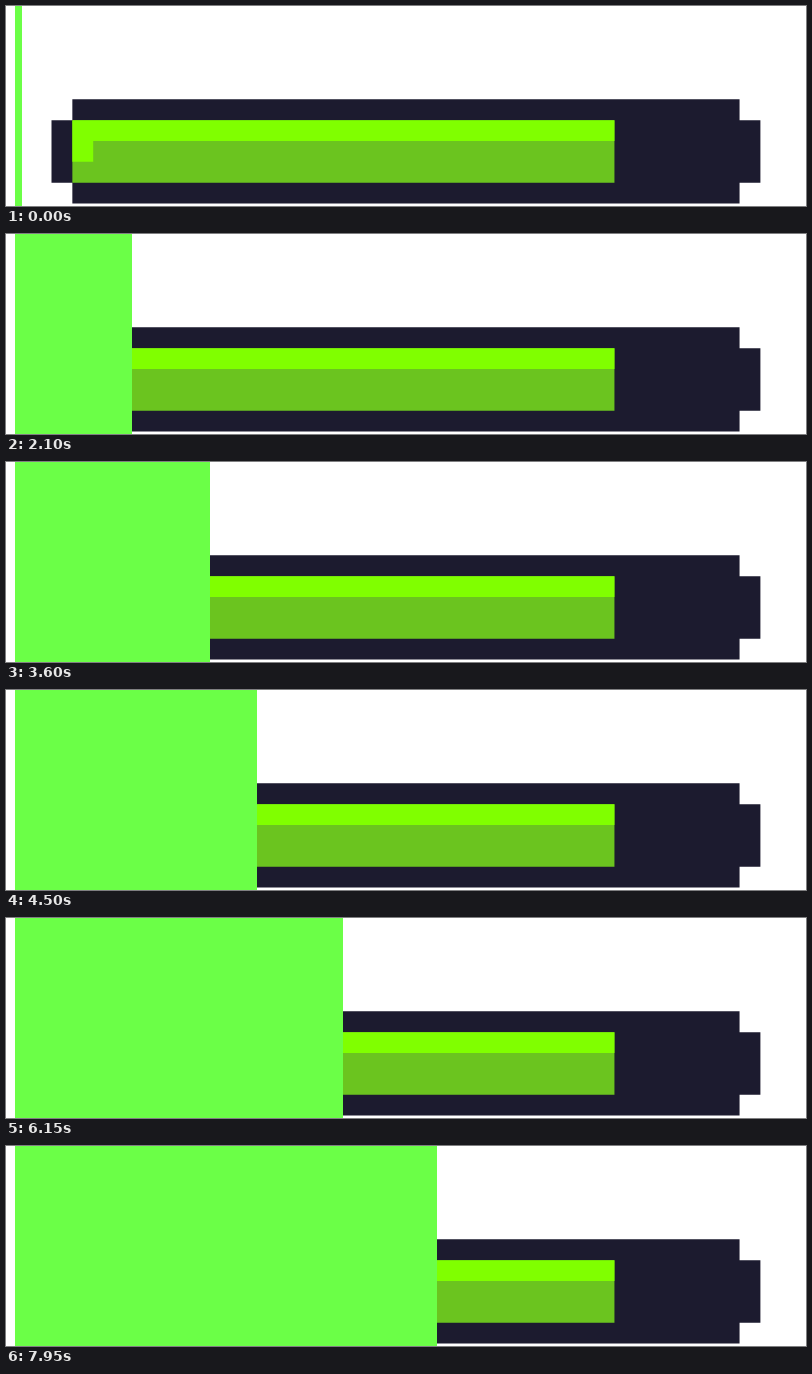
Recreate the animation shown at these times as an HTML page. Size 800 by 200 pixels, loop 8 s.

```html
<!DOCTYPE html>
<html lang="en">
<head>
<meta charset="utf-8">
<title>Energy bar</title>
<style>
  html, body { margin: 0; width: 100%; height: 100%; overflow: hidden; background: #fff; }
  svg { display: block; width: 800px; height: 200px; }
</style>
</head>
<body>
<svg viewBox="0 0 800 200">
  <!-- pixel art on a 34 x 5 grid -->
  <g transform="translate(45.5 93.3) scale(20.85)">
    <path fill="#1c1b2f" d="M1 0H33V1H34V4H33V5H1V4H0V1H1Z"/>
    <path fill="#6bc41f" d="M1 1H27V4H1Z"/>
    <path fill="#80ff00" d="M1 1H27V2H2V3H1Z"/>
  </g>
  <rect id="sweep" x="9" y="0" width="7" height="200" fill="#6bff47"/>
</svg>
<script>
  const LOOP = 8000, STEP = 150, GROWTH = 7.83;
  const sweep = document.getElementById('sweep');
  const start = performance.now();

  function draw(now) {
    const t = Math.max(0, now - start) % LOOP;
    const step = Math.floor(t / STEP);
    sweep.setAttribute('width', Math.round(7 + GROWTH * step));
    requestAnimationFrame(draw);
  }
  draw(start);
</script>
</body>
</html>
```
